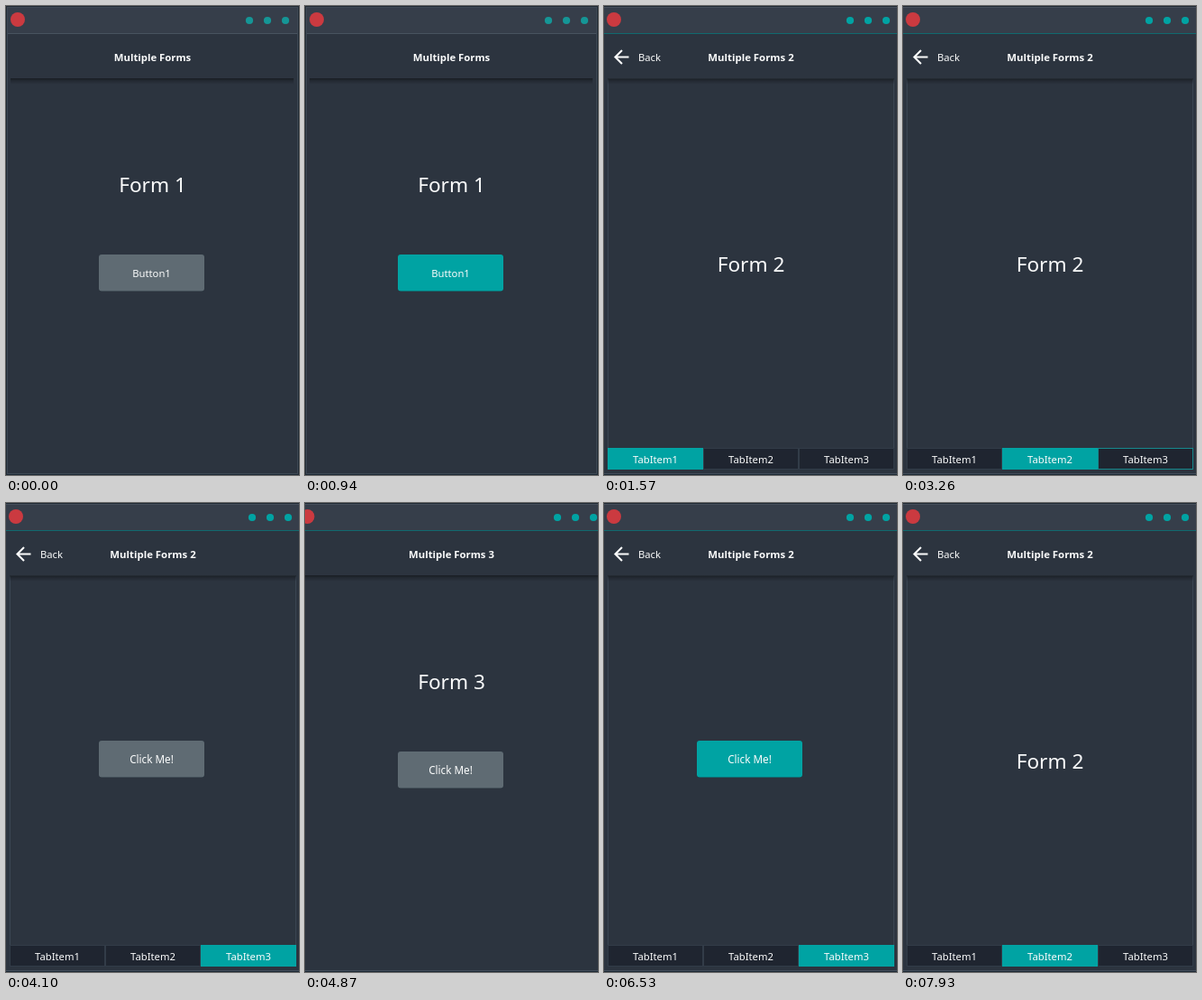
Write an HTML page with a canvas that moves like this. It is 325 by 519 pixels and loops after 8000 ms.

```html
<!DOCTYPE html>
<html lang="en">
<head>
<meta charset="utf-8">
<title>Multiple Forms</title>
<style>
html, body { margin: 0; width: 100%; height: 100%; overflow: hidden; background: #2c343f; }
canvas { display: block; width: 325px; height: 519px; }
</style>
</head>
<body>
<canvas id="stage"></canvas>
<script>
const W = 325, H = 519, LOOP = 8000;
const TEAL = '#00a3a3', TEXT = '#fbfcfc';
const BUTTON = { normal: '#5f6b73', hover: TEAL, pressed: '#0f7d82' };

const canvas = document.getElementById('stage');
const ctx = canvas.getContext('2d');
const ratio = window.devicePixelRatio || 1;
canvas.width = W * ratio;
canvas.height = H * ratio;
ctx.scale(ratio, ratio);

// Each step lists only what changes at that moment.
const timeline = [
  [0, { form: 1, active: false, tab: 1, hoverTab: 0, button: 'normal' }],
  [940, { button: 'hover' }],
  [1390, { active: true }],
  [1420, { button: 'pressed' }],
  [1530, { form: 2, active: false }],
  [1570, { active: true }],
  [2800, { hoverTab: 2 }],
  [2930, { tab: 2, hoverTab: 0 }],
  [3260, { hoverTab: 3 }],
  [3530, { tab: 3, hoverTab: 0, button: 'normal' }],
  [3930, { hoverTab: 2 }],
  [4100, { hoverTab: 0 }],
  [4600, { button: 'hover' }],
  [4730, { button: 'pressed' }],
  [4870, { form: 3, button: 'normal' }],
  [5900, { button: 'hover' }],
  [6400, { button: 'pressed' }],
  [6530, { form: 2, button: 'hover' }],
  [7760, { hoverTab: 2 }],
  [7930, { tab: 2, hoverTab: 0 }]
];

function stateAt(time) {
  const passed = timeline.filter(([start]) => start <= time);
  return Object.assign({}, ...passed.map(([, change]) => change));
}

function rect(x, y, w, h, color) {
  ctx.fillStyle = color;
  ctx.fillRect(x, y, w, h);
}

function outline(x, y, w, h, color) {
  ctx.strokeStyle = color;
  ctx.lineWidth = 1;
  ctx.strokeRect(x + 0.5, y + 0.5, w - 1, h - 1);
}

function circle(x, y, r, color) {
  ctx.fillStyle = color;
  ctx.beginPath();
  ctx.arc(x, y, r, 0, 2 * Math.PI);
  ctx.fill();
}

function roundRect(x, y, w, h, r, color) {
  ctx.fillStyle = color;
  ctx.beginPath();
  ctx.roundRect(x, y, w, h, r);
  ctx.fill();
}

function text(label, x, y, size = 11.25, weight = 400, align = 'center') {
  ctx.font = `${weight} ${size}px "Noto Sans", "Open Sans", sans-serif`;
  ctx.textAlign = align;
  ctx.fillStyle = TEXT;
  ctx.fillText(label, x, y);
}

function button(label, y, state, size) {
  roundRect(103, y, 117, 41, 3, '#25303a');
  roundRect(103, y, 117, 40.5, 3, BUTTON[state]);
  text(label, 161.5, y + 25, size);
}

function windowFrame({ form, active }) {
  const iconX = [13, 11, 2.5][form - 1];
  const firstDot = [270, 273, 280][form - 1];
  rect(0, 0, W, H, '#2c343f');
  rect(0, 0, W, 30, '#363e4a');
  rect(0, 0, W, 1, '#202a34');
  rect(0, 1, W, 1, '#46505c');
  rect(0, 30, W, 1, active ? '#10696f' : '#48535f');
  rect(0, 517, W, 1, '#424d5a');
  rect(0, 518, W, 1, '#1c2935');
  if (form === 1) {
    outline(1, 1, W - 2, H - 2, '#3e4955');
    rect(0, 0, 1, H, '#202a34');
    rect(W - 1, 0, 1, H, '#202a34');
  }
  circle(iconX, 15, 8, '#cb3a40');
  for (let i = 0; i < 3; i++) {
    circle(firstDot + 20 * i, 16, 4.1, active ? TEAL : '#159696');
  }
}

function headerShadow(x, width) {
  const fade = ctx.createLinearGradient(0, 80, 0, 87);
  fade.addColorStop(0, 'rgba(0,0,0,.45)');
  fade.addColorStop(0.4, 'rgba(0,0,0,.2)');
  fade.addColorStop(1, 'rgba(0,0,0,0)');
  rect(x, 80, width, 7, fade);
}

function backButton() {
  ctx.strokeStyle = TEXT;
  ctx.lineWidth = 2.1;
  ctx.beginPath();
  ctx.moveTo(27.5, 56.5);
  ctx.lineTo(13, 56.5);
  ctx.moveTo(20, 49);
  ctx.lineTo(12.5, 56.5);
  ctx.lineTo(20, 64);
  ctx.stroke();
  text('Back', 38, 61, 11.25, 400, 'left');
}

function tabs({ tab, hoverTab }) {
  for (let i = 1; i <= 3; i++) {
    const x = 4 + 106 * (i - 1);
    const selected = i === tab;
    rect(x, 489, 106, 24, selected ? TEAL : '#1f2530');
    if (!selected) outline(x, 489, 106, 24, i === hoverTab ? '#16898d' : '#323c48');
    text('TabItem' + i, x + 53, 506);
  }
}

function tabbedForm(state) {
  outline(4, 80, 318, 410, '#3b4653');
  headerShadow(4, 318);
  backButton();
  text('Multiple Forms 2', 163, 61, 11.4, 700);
  if (state.tab === 3) button('Click Me!', 263, state.button, 11.7);
  else text('Form 2', 163, 294, 22.6);
  tabs(state);
}

function simpleForm({ form, button: look }) {
  if (form === 1) headerShadow(5, 314);
  else headerShadow(0, W);
  text(form === 1 ? 'Multiple Forms' : 'Multiple Forms 3', 162.5, 61, 11.35, 700);
  text('Form ' + form, 162.5, 206, 22.6);
  if (form === 1) button('Button1', 275, look, 11.25);
  else button('Click Me!', 275, look, 11.7);
}

function draw(now) {
  const state = stateAt(now % LOOP);
  windowFrame(state);
  if (state.form === 2) tabbedForm(state);
  else simpleForm(state);
  requestAnimationFrame(draw);
}

const start = performance.now();
requestAnimationFrame(function tick() {
  draw(Math.max(0, performance.now() - start));
});
</script>
</body>
</html>
```
